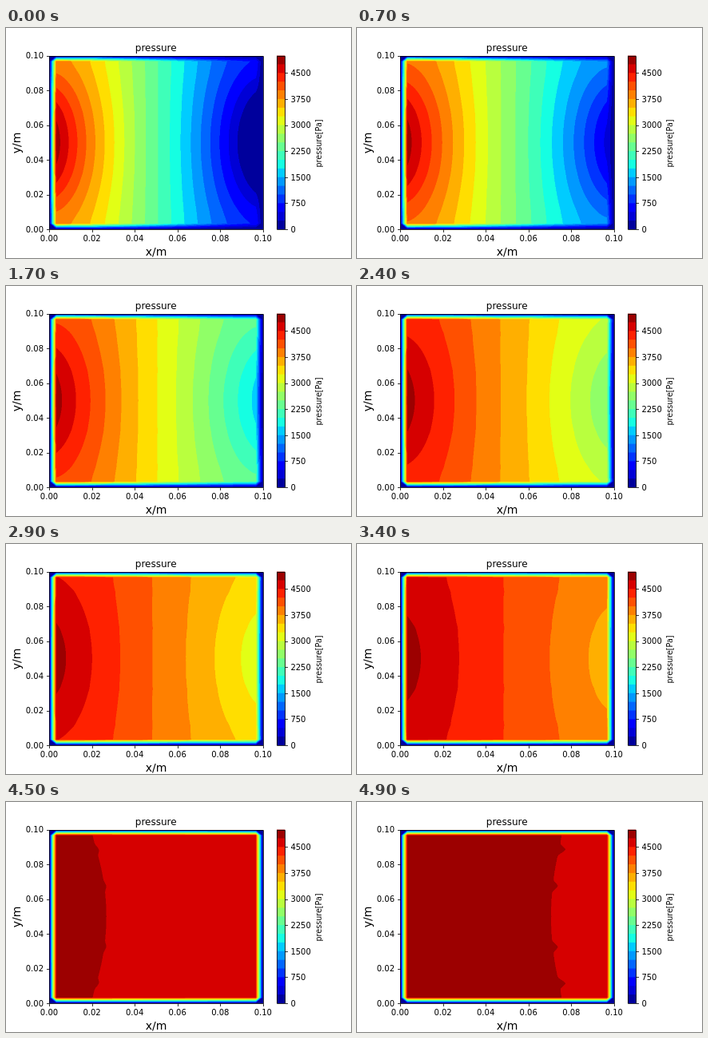
An HTML page with a canvas that plays this animation: 432x288 px, repeating every 5000 ms.

```html
<!DOCTYPE html>
<html lang="en">
<head>
<meta charset="utf-8">
<title>pressure</title>
<style>
  html, body { margin: 0; width: 432px; height: 288px; overflow: hidden; background: #fff; }
  canvas, svg { position: absolute; left: 0; top: 0; }
  text { font-family: "DejaVu Sans", sans-serif; }
</style>
</head>
<body>
<canvas id="plot" width="432" height="288"></canvas>
<svg id="axes" width="432" height="288" text-anchor="middle" font-size="10"></svg>
<script>
const X0 = 54, X1 = 321.84, Y0 = 34.56, Y1 = 252, CELLS = 30, LEVELS = 20, PMAX = 5000;
const width = X1 - X0, height = Y1 - Y0, dx = width / CELLS, dy = height / CELLS;
const clamp = (v, lo = 0, hi = 1) => Math.min(hi, Math.max(lo, v));

function jet(v) {
  return [
    v < .66 ? (v - .35) / .31 : v < .89 ? 1 : 1 - (v - .89) / .22,
    v < .375 ? (v - .125) / .25 : v < .64 ? 1 : (.91 - v) / .27,
    v < .11 ? .5 + v / .22 : v < .34 ? 1 : (.65 - v) / .31
  ].map(c => Math.round(255 * clamp(c)));
}
const COLORS = Array.from({ length: LEVELS }, (_, i) => jet((i + .5) / LEVELS));
const PACKED = COLORS.map(([r, g, b]) => (255 << 24 | b << 16 | g << 8 | r) >>> 0);

const SS = 2, W = Math.round(width * SS), H = Math.round(height * SS);
const ctx = document.getElementById("plot").getContext("2d");
const field = new OffscreenCanvas(W, H), fctx = field.getContext("2d");
const img = fctx.createImageData(W, H);
const pixels = new Uint32Array(img.data.buffer);

// pressure loss by column, w from -1 (left) to 1 (right): along the centre line and the walls
const cols = Array.from({ length: W }, (_, i) => {
  const x = (i + .5) * width / W;
  const w = clamp((2 * x - width) / (width - 2 * dx), -1, 1);
  const base = 2550 + 1900 * w;
  return {
    mid: base + 680 * w * Math.abs(w) ** .6,
    wall: base - 340 * w ** 5,
    ramp: Math.min(1, x / dx, (width - x) / dx)
  };
});
// by row: blend from wall to centre line, and a faint ripple
const rows = Array.from({ length: H }, (_, j) => {
  const y = (j + .5) * height / H, off = Math.abs(y - height / 2);
  return {
    bulge: Math.cos(clamp(off / (height / 2 - dy)) * Math.PI / 2) ** 1.3,
    ripple: 3 * Math.max(0, Math.cos((off - 38) / 45.5 * 2 * Math.PI)) ** 4,
    ramp: Math.min(1, y / dy, (height - y) / dy)
  };
});

function draw(t) {
  const loss = .006 + .994 * (1 - (t / 5300) ** 1.2) ** 1.65;
  rows.forEach((r, j) => cols.forEach((c, i) => {
    const p = 4838 - loss * (c.wall + (c.mid - c.wall) * r.bulge) + r.ripple;
    const v = p * Math.max(0, c.ramp + r.ramp - 1);
    pixels[j * W + i] = PACKED[clamp(Math.floor(v / PMAX * LEVELS), 0, LEVELS - 1)];
  }));
  fctx.putImageData(img, 0, 0);
  ctx.drawImage(field, X0, Y0, width, height);
}

// axes, labels and colour bar
let svg = "";
const label = (s, x, y, extra = "") => svg += `<text x="${x}" y="${y}" ${extra}>${s}</text>`;
const line = d => svg += `<path d="${d}" fill="none" stroke="#000" stroke-width=".8"/>`;
const upright = (s, x, y, size) =>
  label(s, 0, 0, `font-size="${size}" transform="translate(${x} ${y}) rotate(-90)"`);
const snap = v => Math.floor(v + .5) + .5;

// tallest first, so that no seams show
for (let i = LEVELS - 1; i >= 0; i--) {
  const h = height * (i + 1) / LEVELS;
  svg += `<rect x="339" y="${Y1 - h}" width="10.4" height="${h}" fill="rgb(${COLORS[i]})"/>`;
}
line("M54.5 35.5H322.5V252.5H54.5Z");
line("M339.5 35.5H349.5V252.5H339.5Z");
for (let i = 0; i <= 5; i++) {
  const x = X0 + width * i / 5, y = Y1 - height * i / 5, s = (i * .02).toFixed(2);
  line(`M${snap(x)} 252.5v3.5`);
  line(`M54.5 ${snap(y)}h-3.5`);
  label(s, x, 266.6);
  label(s, 47, y + 3.8, 'text-anchor="end"');
}
for (let v = 0; v <= 4500; v += 750) {
  const y = Y1 - height * v / PMAX;
  line(`M349.5 ${snap(y)}h3.5`);
  label(v, 356.4, y + 3.8, 'text-anchor="start"');
}
label("pressure", 187.7, 28.6, 'font-size="12"');
label("x/m", 188, 285, 'font-size="14"');
upright("y/m", 18, 144, 14);
upright("pressure[Pa]", 394.5, 144.5, 9.6);
document.getElementById("axes").innerHTML = svg;

const start = performance.now();
let shown = -1;
function tick() {
  const t = Math.floor((performance.now() - start) % 5000 / 100) * 100;
  if (t !== shown) draw(shown = t);
  requestAnimationFrame(tick);
}
tick();
</script>
</body>
</html>
```
